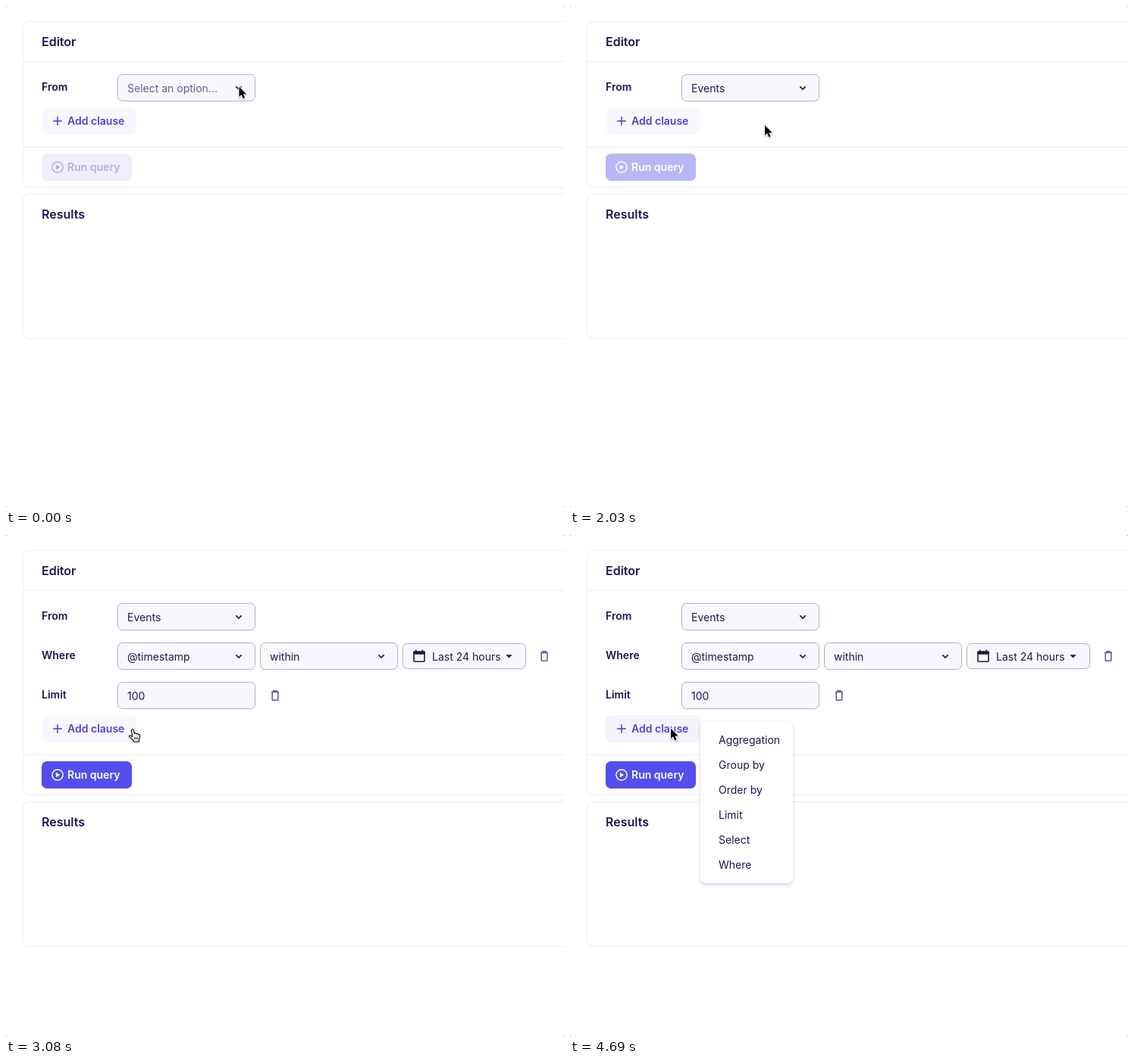
Write an HTML page with a canvas that moves like this. It is 736x662 px and loops after 6090 ms.

```html
<!DOCTYPE html>
<html lang="en">
<head>
<meta charset="utf-8">
<title>Query editor</title>
<style>
html, body { margin: 0; width: 100%; height: 100%; overflow: hidden; background: #fff; }
canvas { display: block; width: 736px; height: 662px; }
</style>
</head>
<body>
<canvas id="stage" width="736" height="662"></canvas>
<script>
const ctx = document.getElementById('stage').getContext('2d');
const LOOP = 6090, STEP = 70;
const INK = '#1c1850', MUTED = '#635e8b', FIELD = '#f8f7fe', LINE = '#efeef4';

// Moments of the interaction, in ms
const PRESS = 490, OPEN = 630, PICK = 1890, CHOSEN = 1960, ROWS = 2170;
const HOVER = 3150, CLICK = 4130, MENU = 4200;

const ARROW = new Path2D('M0 0V13.6L3.1 10.7L5.3 15.7L7.6 14.7L5.4 9.9H9.6Z');
const HAND = new Path2D('M-.6 2.2C-.8.6 1.8.4 2.2 2L3.3 6.6C3.9 5.6 5.6 5.8 5.9 7C6.6 6.2 8.1 6.6 8.3 7.7' +
  'C9 7.2 10.2 7.7 10.3 8.9C10.6 11.5 10 13.2 9.2 15V17.2H2.2V16C.8 14.4-1 12.6-3.2 10.8C-4.4 9.6-3.2 8.4-1.8 9.2L.6 10.8Z');
const KNUCKLES = new Path2D('M3.2 11V14.4M5.3 11V14.4M7.4 11V14.4');
const BEAM = new Path2D('M-3 -8Q0 -8 0 -6V6Q0 8 -3 8M3 -8Q0 -8 0 -6M0 6Q0 8 3 8');
const TRASH = new Path2D('M-5 -4.5H5M-2 -4.5V-6.2H2V-4.5M-3.8 -4.5V5.2Q-3.8 6.3 -2.7 6.3H2.7Q3.8 6.3 3.8 5.2V-4.5');

const smooth = u => u * u * (3 - 2 * u);
const linear = u => u;

// Interpolates rows of [time, ...values]
function track(t, rows, ease = linear) {
  if (t <= rows[0][0]) return rows[0].slice(1);
  for (let i = 1; i < rows.length; i++) {
    const [a, b] = [rows[i - 1], rows[i]];
    if (t < b[0]) {
      const u = ease((t - a[0]) / (b[0] - a[0]));
      return a.slice(1).map((v, k) => v + (b[k + 1] - v) * u);
    }
  }
  return rows[rows.length - 1].slice(1);
}
const rgb = (t, rows) => `rgb(${track(t, rows).map(Math.round)})`;

const POINTER = [[1050, 307.5, 106.5], [1470, 257, 157.5], [2590, 257, 157.5],
  [3220, 153, 270], [3710, 133, 255.5]];
const ADD_FILL = [[HOVER, 248, 247, 254], [3400, 211, 209, 250], [CLICK, 211, 209, 250],
  [4270, 152, 148, 239], [4690, 244, 243, 252]];
const ADD_INK = [[HOVER, 79, 70, 201], [3400, 36, 25, 180], [CLICK, 36, 25, 180], [4270, 79, 70, 208]];
const RUN_FILL = [[CHOSEN, 240, 238, 250], [2030, 185, 183, 243], [2240, 84, 78, 238]];
const RUN_INK = [[CHOSEN, 179, 175, 223], [2030, 255, 255, 255]];
const FIELD_EDGE = [[ROWS, 176, 171, 214], [2450, 137, 131, 189], [2660, 137, 131, 189], [2870, 176, 171, 214]];

function box(x, y, w, h, r, fill, edge, width = 1) {
  ctx.beginPath();
  ctx.roundRect(x, y, w, h, r);
  if (fill) { ctx.fillStyle = fill; ctx.fill(); }
  if (edge) { ctx.strokeStyle = edge; ctx.lineWidth = width; ctx.stroke(); }
}

function text(s, x, y, color = INK, weight = 400, size = 14) {
  ctx.font = `${weight} ${size}px Inter, sans-serif`;
  ctx.fillStyle = color;
  ctx.fillText(s, x, y);
}

function poly(points, color, width) {
  ctx.beginPath();
  points.forEach(([x, y]) => ctx.lineTo(x, y));
  if (width) {
    ctx.strokeStyle = color; ctx.lineWidth = width; ctx.stroke();
  } else {
    ctx.fillStyle = color; ctx.fill();
  }
}

function at(x, y, draw) {
  ctx.save();
  ctx.translate(x, y);
  draw();
  ctx.restore();
}

const rule = y => poly([[23, y + .5], [736, y + .5]], LINE, 1);

function popup(x, y, w, h) {
  ctx.save();
  ctx.shadowColor = 'rgba(80, 70, 190, .28)';
  ctx.shadowBlur = 5;
  ctx.shadowOffsetY = 2;
  box(x, y, w, h, 7, '#fff');
  ctx.restore();
}

function select(x, y, label, color = INK, edge = '#b0abd6') {
  box(x + .5, y + .5, 181, 35, 6, FIELD, edge);
  text(label, x + 13, y + 24, color);
  poly([[x + 156.3, y + 16.4], [x + 160, y + 20], [x + 163.7, y + 16.4]], INK, 1.7);
}

function trash(x, y) {
  at(x, y, () => {
    ctx.strokeStyle = '#5b5690';
    ctx.lineWidth = 1.5;
    ctx.stroke(TRASH);
  });
}

function dateField() {
  box(523.5, 143.5, 162, 33, 6, FIELD, '#b0abd6');
  box(538, 154.3, 14, 13, 1, null, INK, 1.6);
  ctx.fillStyle = INK;
  ctx.fillRect(537.3, 153.6, 15.4, 4.2);
  ctx.fillRect(539.8, 151.8, 1.8, 3);
  ctx.fillRect(548.4, 151.8, 1.8, 3);
  text('Last 24 hours', 562, 166);
  poly([[659.2, 158.2], [667.8, 158.2], [663.5, 162.6]], INK);
}

function clauseRows(t) {
  text('Where', 47, 164, INK, 600);
  select(147, 142, '@timestamp', INK, rgb(t, FIELD_EDGE));
  select(335, 142, 'within');
  dateField();
  trash(710, 160);
  text('Limit', 47, 216, INK, 600);
  box(147.5, 194.5, 181, 35, 6, FIELD, '#b0abd6');
  text('100', 160, 218);
  trash(355, 212);
}

function addButton(t, y) {
  const ink = rgb(t, ADD_INK), left = t > HOVER ? 47 : 48;
  box(left, y, 172 - left, 36, 8, rgb(t, ADD_FILL));
  at(68, y + 18, () => {
    ctx.rotate(track(t, [[MENU, 0], [4340, Math.PI / 2]])[0]);
    poly([[-5.8, 0], [5.8, 0]], ink, 1.6);
    poly([[0, -5.8], [0, 5.8]], ink, 1.6);
  });
  text('Add clause', 81, y + 23, ink, 600);
}

function runButton(t, y) {
  const ink = rgb(t, RUN_INK);
  box(47, y, 119, 36, 7, rgb(t, RUN_FILL));
  ctx.beginPath();
  ctx.arc(68, y + 18, 7.1, 0, 7);
  ctx.strokeStyle = ink;
  ctx.lineWidth = 1.5;
  ctx.stroke();
  poly([[65.9, y + 14.7], [71.2, y + 18], [65.9, y + 21.3]], ink);
  text('Run query', 81, y + 23, ink, 600);
}

function optionList(t) {
  popup(147, 134, 180, 49);
  box(156, 142, 163, 33, 8, t < PICK ? FIELD : '#e8e6fb');
  text('Events', 171, 164);
}

function clauseMenu() {
  popup(172, 246, 122, 214);
  ['Aggregation', 'Group by', 'Order by', 'Limit', 'Select', 'Where']
    .forEach((s, i) => text(s, 196, 276 + i * 33));
}

function pressRing() {
  box(146.5, 89.5, 183, 37, 7, null, 'rgba(84, 78, 238, .3)', 2);
  ctx.beginPath();
  ctx.arc(308, 108, 31, 0, 7);
  ctx.fillStyle = 'rgba(84, 78, 238, .12)';
  ctx.fill();
}

function cursorKind(t, y) {
  if (t < OPEN || t >= MENU) return 'arrow';
  if (t < CHOSEN) return y > 142 ? 'hand' : 'arrow';
  if (t < ROWS) return 'arrow';
  if (y < 178 || y > 238) return 'hand';
  return y > 194 && y < 230 ? 'beam' : 'arrow';
}

function pointer(t) {
  const [x, y] = track(t, POINTER, smooth);
  const kind = cursorKind(t, y);
  at(x, y, () => {
    ctx.lineJoin = 'round';
    if (kind === 'beam') {
      ctx.strokeStyle = '#000';
      ctx.lineWidth = 1.1;
      ctx.stroke(BEAM);
      return;
    }
    const hand = kind === 'hand', shape = hand ? HAND : ARROW;
    ctx.save();
    ctx.shadowColor = 'rgba(0, 0, 0, .3)';
    ctx.shadowBlur = 2;
    ctx.shadowOffsetY = 1;
    ctx.strokeStyle = '#fff';
    ctx.lineWidth = 2;
    ctx.stroke(shape);
    ctx.restore();
    ctx.fillStyle = hand ? '#fff' : '#000';
    ctx.fill(shape);
    if (hand) {
      ctx.strokeStyle = '#000';
      ctx.lineWidth = 1.1;
      ctx.stroke(shape);
      ctx.lineWidth = .9;
      ctx.stroke(KNUCKLES);
    }
  });
}

function draw(t) {
  const expanded = t >= ROWS, dy = expanded ? 104 : 0;
  ctx.fillStyle = '#8c8c8c';
  ctx.fillRect(0, 0, 736, 662);
  box(0, 0, 736, 662, 2, '#fff');

  box(22.5, 20.5, 740, 219 + dy, 8, '#fff', LINE);
  rule(73);
  rule(186 + dy);
  box(22.5, 248.5 + dy, 740, 191, 8, '#fff', LINE);
  text('Editor', 47, 53, INK, 600, 16);
  text('Results', 47, 281 + dy, INK, 600, 16);

  text('From', 47, 112, INK, 600);
  if (t < CHOSEN) select(147, 90, 'Select an option...', MUTED);
  else select(147, 90, 'Events');
  if (expanded) clauseRows(t);
  addButton(t, 134 + dy);
  runButton(t, 195 + dy);

  if (t >= PRESS && t < OPEN) pressRing();
  if (t >= OPEN && t < CHOSEN) optionList(t);
  if (t >= MENU) clauseMenu();
  pointer(t);
}

function frame() {
  const t = performance.now() % LOOP;
  draw(Math.floor(t / STEP) * STEP);
  requestAnimationFrame(frame);
}
frame();
</script>
</body>
</html>
```
